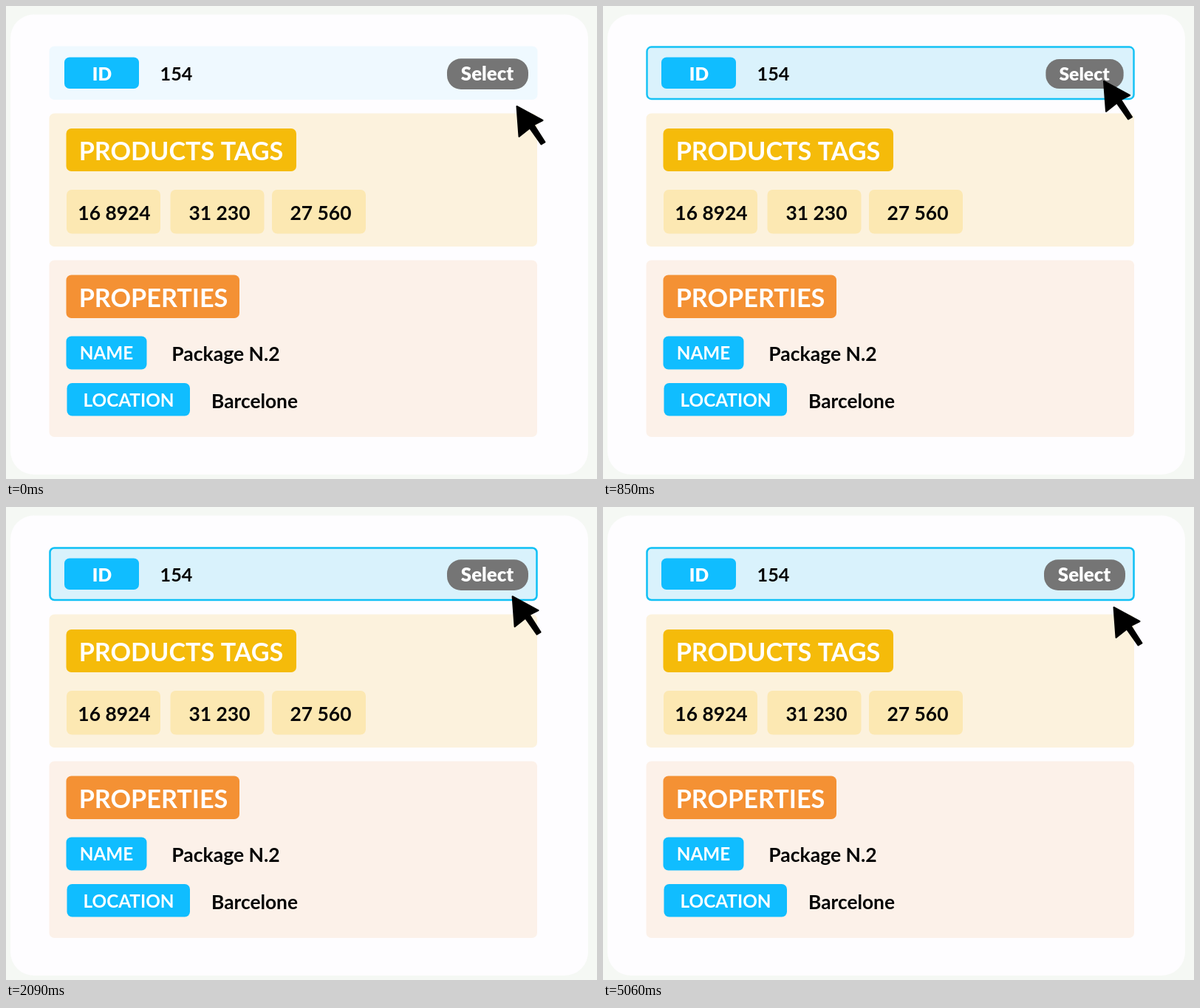
An HTML page with a canvas that plays this animation: 800 by 641 pixels, repeating every 5090 ms.

```html
<!DOCTYPE html>
<html lang="en">
<head>
<meta charset="utf-8">
<title>Select a row</title>
<style>
  html, body { margin: 0; width: 100%; height: 100%; overflow: hidden; background: #f5f8f4; }
  canvas { display: block; width: 800px; height: 641px; }
</style>
</head>
<body>
<canvas id="stage" width="800" height="641"></canvas>
<script>
const ctx = document.getElementById('stage').getContext('2d');
const LOOP = 5090;
const BLUE = '#10bdff';

const clamp = v => Math.min(1, Math.max(0, v));
const smooth = v => v * v * (3 - 2 * v);
const span = (t, from, to) => smooth(clamp((t - from) / (to - from)));
const mix = (a, b, k) => a + (b - a) * k;
const mixColor = (a, b, k) => `rgb(${a.map((v, i) => Math.round(mix(v, b[i], k))).join()})`;

function box(x, y, w, h, r, color) {
  ctx.beginPath();
  ctx.roundRect(x, y, w, h, r);
  ctx.fillStyle = color;
  ctx.fill();
}

function label(text, centerX, baseline, size, color = '#050505', weight = 700) {
  ctx.font = `${weight} ${size}px Lato, sans-serif`;
  ctx.textAlign = 'center';
  ctx.fillStyle = color;
  ctx.fillText(text, centerX, baseline);
}

function drawRow(highlight) {
  box(58.5, 54.5, 661, 72.5, 7, mixColor([239, 249, 255], [217, 242, 252], highlight));
  if (highlight > 0) {
    ctx.globalAlpha = highlight;
    ctx.strokeStyle = '#0fc0f5';
    ctx.lineWidth = mix(0.5, 2.5, highlight);
    ctx.beginPath();
    ctx.roundRect(59.5, 55.5, 659, 70.5, 6);
    ctx.stroke();
    ctx.globalAlpha = 1;
  }
  box(79, 69.5, 101, 42.5, 7, BLUE);
  label('ID', 130, 100.5, 24.5, '#fff', 900);
  label('154', 230.5, 101, 25.2);
}

function drawTags() {
  box(58.5, 145.5, 660.5, 180.5, 7, '#fcf2dd');
  box(81.5, 166, 311.5, 58, 7, '#f5bb0a');
  label('PRODUCTS TAGS', 237, 209, 34.2, '#fff');
  [['16 8924', 82, 146.5], ['31 230', 222.5, 289], ['27 560', 360, 426]].forEach(([text, x, center]) => {
    box(x, 249, 127, 59.5, 7, '#fce8b2');
    label(text, center, 290, 26.4);
  });
}

function drawProperties() {
  box(58.5, 344.5, 660.5, 239.5, 7, '#fcf1e9');
  box(81.5, 364.5, 234.5, 58.5, 7, '#f49134');
  label('PROPERTIES', 199.5, 407.5, 34.2, '#fff');
  box(81.5, 447.5, 109, 45, 7, BLUE);
  label('NAME', 136, 479, 24.3, '#fff');
  label('Package N.2', 297.5, 480.5, 26.5);
  box(82.5, 511, 166.5, 44.5, 7, BLUE);
  label('LOCATION', 166, 542.5, 24.3, '#fff');
  label('Barcelone', 336.5, 544.5, 26.3);
}

function drawButton(scale) {
  ctx.save();
  ctx.translate(652, 92);
  ctx.scale(scale, scale);
  box(-55, -20.8, 110, 41.8, 19, '#757575');
  label('Select', -0.5, 9.3, 25.8, '#fff', 900);
  ctx.restore();
}

function drawCursor(x, y) {
  ctx.save();
  ctx.translate(x, y);
  ctx.beginPath();
  [[1, 1], [36, 20], [24, 26], [39, 49.5], [34, 52.5], [18.5, 30.5], [4, 42]]
    .forEach(([px, py]) => ctx.lineTo(px, py));
  ctx.closePath();
  ctx.fillStyle = ctx.strokeStyle = '#000';
  ctx.lineWidth = 2;
  ctx.lineJoin = 'round';
  ctx.fill();
  ctx.stroke();
  ctx.restore();
}

function draw(t) {
  const reach = span(t, 60, 600) - span(t, 1885, 2265);
  const press = span(t, 590, 780) - span(t, 1190, 1640);

  ctx.fillStyle = '#f5f8f4';
  ctx.fillRect(0, 0, 800, 641);
  box(6, 11.5, 782, 623.5, 32, '#fefdff');
  drawRow(span(t, 600, 880));
  drawTags();
  drawProperties();
  drawButton(1 - 0.043 * press);
  drawCursor(690.5 - 13.5 * reach, 135 - 34 * reach);
}

const start = performance.now();
function tick() {
  draw((performance.now() - start) % LOOP);
  requestAnimationFrame(tick);
}
tick();
</script>
</body>
</html>
```
